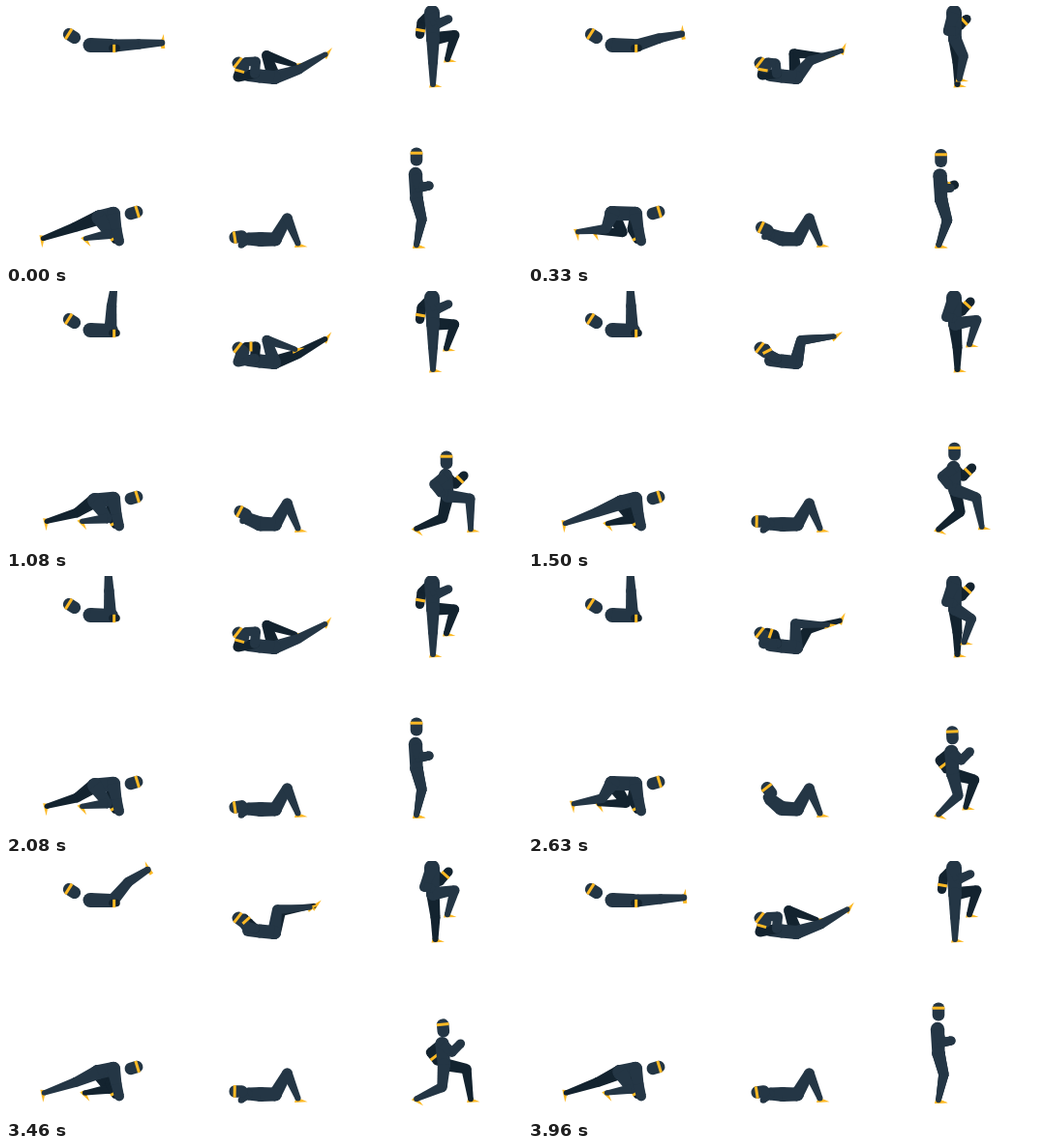
These frames come from a looping animation (533 by 266 pixels, 4 s). An HTML page with a canvas:

```html
<!DOCTYPE html>
<html lang="en">
<head>
<meta charset="utf-8">
<title>Workout</title>
<style>
html, body { margin: 0; width: 100%; height: 100%; overflow: hidden; background: #fff; }
canvas { display: block; width: 533px; height: 266px; }
</style>
</head>
<body>
<canvas id="stage"></canvas>
<script>
const NAVY = '#243645', DARK = '#13232f', GOLD = '#fdb924';
const W = 533, H = 266, LOOP = 4000, RAD = Math.PI / 180;
const canvas = document.getElementById('stage');
const ctx = canvas.getContext('2d');
const dpr = window.devicePixelRatio || 1;
canvas.width = W * dpr;
canvas.height = H * dpr;

const clamp = (v, a = 0, b = 1) => Math.min(b, Math.max(a, v));
const lerp = (a, b, k) => a + (b - a) * k;
const mix = (p, q, k) => [lerp(p[0], q[0], k), lerp(p[1], q[1], k)];
const add = (p, x, y) => [p[0] + x, p[1] + y];
const polar = (p, r, deg) => add(p, r * Math.cos(deg * RAD), -r * Math.sin(deg * RAD));
const hump = k => Math.sin(Math.PI * k);
const ramp = (t, a, b) => {
  const u = clamp((t - a) / (b - a));
  return u * u * (3 - 2 * u);
};
const rise = (t, a, b, c, d) => ramp(t, a, b) - ramp(t, c, d);

function poly(pts, color) {
  ctx.fillStyle = color;
  ctx.beginPath();
  pts.forEach(p => ctx.lineTo(p[0], p[1]));
  ctx.closePath();
  ctx.fill();
}

function dot(p, r, color) {
  ctx.fillStyle = color;
  ctx.beginPath();
  ctx.arc(p[0], p[1], r, 0, 7);
  ctx.fill();
}

// Tapered limb through joints, with a radius at each joint
function limb(color, joints, radii) {
  joints.forEach((p, i) => {
    dot(p, radii[i], color);
    if (!i) return;
    const o = joints[i - 1], r = radii[i - 1], s = radii[i];
    const a = Math.atan2(p[1] - o[1], p[0] - o[0]);
    const nx = -Math.sin(a), ny = Math.cos(a);
    poly([add(o, nx * r, ny * r), add(p, nx * s, ny * s),
          add(p, -nx * s, -ny * s), add(o, -nx * r, -ny * r)], color);
  });
}

function local(p, deg, draw) {
  ctx.save();
  ctx.translate(p[0], p[1]);
  ctx.rotate(deg * RAD);
  draw();
  ctx.restore();
}

function foot(p, deg) {
  local(p, deg, () => poly([[-3, 0], [3, 0], [9.5, 2.8], [-4, 3.4]], GOLD));
}

function head(p, deg) {
  local(p, deg, () => {
    ctx.fillStyle = NAVY;
    ctx.beginPath();
    ctx.roundRect(-6.3, -9.5, 12.6, 19, 6);
    ctx.fill();
    ctx.fillStyle = GOLD;
    ctx.fillRect(-6.3, -5.3, 12.6, 3);
  });
}

// Wristband across the segment a-b at fraction k
function band(a, b, k, r) {
  const deg = Math.atan2(b[1] - a[1], b[0] - a[0]) / RAD;
  local(mix(a, b, k), deg, () => {
    ctx.fillStyle = GOLD;
    ctx.fillRect(-1.5, -r, 3, 2 * r);
  });
}

// Middle joint of a two-bone limb
function bend(a, b, l1, l2) {
  const dx = b[0] - a[0], dy = b[1] - a[1];
  const d = Math.hypot(dx, dy);
  const c = clamp((l1 * l1 + d * d - l2 * l2) / (2 * l1 * d), -1, 1);
  const ang = Math.atan2(dy, dx) - Math.acos(c);
  return add(a, l1 * Math.cos(ang), l1 * Math.sin(ang));
}

function leg(color, hip, knee, ankle, deg, radii) {
  foot(ankle, deg);
  limb(color, [hip, knee, ankle], radii);
}

function legRaise(t) {
  const k = rise(t, 60, 1300, 2800, 4000);
  const a = 3.5 + 89 * k, flex = 9 * hump(k);
  const hip = [lerp(113, 107.5, k), lerp(41, 39.5, k)];
  const knee = polar(hip, 24, a + flex), end = polar(knee, 24, a - flex);
  head([68, 31], -58);
  local(end, flex - a, () => poly([[-1, 6], [-1, 2], [0, -3.5], [2.5, -9], [3, 6]], GOLD));
  limb(NAVY, [hip, knee, end], [6.5, 5.2, 3.4]);
  limb(NAVY, [[87, 40.5], [109, 41]], [7.5, 7]);
  limb(DARK, [[110, 43.5], [114, 43.5]], [3.8, 3.8]);
  band([104, 44], [120, 44], 0.48, 4.2);
}

function bicycle(t) {
  const q = Math.cos(t / 1000 * Math.PI), twist = clamp(q * 1.5, -1, 1);
  const hip = [277, 74], shoulder = [257, 70];
  const pedal = (color, s) => {
    const m = 1 - s * s;
    const knee = [285.5 + 16.5 * s - 3.5 * m, 58.5 + 7.5 * s - 7.5 * m];
    const ankle = [314 + 16 * s + 2 * m, 55.5 - 5.5 * s - 8.5 * m];
    leg(color, hip, knee, ankle, -45 - 16 * s - 60 * s * m, [7, 5, 2.6]);
  };
  const elbow = s => mix([239.5, 73.5], [258, 57.5], (s + 1) / 2);
  const hand = s => mix([243, 61], [248, 57.5], (s + 1) / 2);
  const far = [elbow(-twist), hand(-twist)];
  pedal(DARK, -q);
  pedal(NAVY, q);
  limb(NAVY, [[250, 72], [262, 72.5], hip], [6, 7, 7]);
  limb(DARK, [shoulder, ...far], [5, 5, 4.5]);
  limb(NAVY, [shoulder, elbow(twist), hand(twist)], [5, 5, 4.5]);
  head([242.5, 61], -52);
  band(...far, 0.5, 5);
}

function highKnees(t) {
  const c = Math.cos(t / 500 * Math.PI), k = clamp(c * 1.5, -1, 1) / 2 + 0.5;
  const lift = d => ramp(230 - Math.abs(d), 0, 200);
  const far = lift((t + 500) % 1000 - 500), near = lift(t % 1000 - 500);
  const hip = [441, 34], neck = [440, 7];
  const step = (color, x, h) => {
    const knee = [lerp(x, 463.5, h) + 6 * hump(h), lerp(58, 30, h)];
    const ankle = [lerp(x, 456, h) + 2 * hump(h), lerp(81, 55, h)];
    leg(color, hip, knee, ankle, 0, [6.8, 5, 3]);
  };

  const elbow = mix([448, 21], [429.5, 17], k), hand = mix([457, 11], [427.5, 29.5], k);
  limb(DARK, [neck, elbow, hand], [5.5, 5, 4.6]);
  band(elbow, hand, 0.65, 5);
  step(DARK, 443.5, far);
  limb(NAVY, [neck, hip], [8, 6.8]);
  step(NAVY, 441, near);
  limb(NAVY, [neck, mix([432, 27], [445, 19], k), mix([439, 28], [457, 13.5], k)], [6.5, 5, 4.3]);
}

function climber(t) {
  const c = Math.cos(t / 500 * Math.PI), k = Math.min(1, 2 * (1 - c * c));
  const hip = [96 - 9 * k, 219 - 4.5 * k], shoulder = [111, 215];
  const step = (color, s) => {
    const knee = mix([71, 229], [107, 236], (s + 1) / 2);
    const ankle = [60.5 + 17 * s + 5 * s ** 3, 240.5 - 9 * (1 - s * s)];
    leg(color, hip, knee, ankle, 62 - 18 * s, [7.5, 5, 2.6]);
  };
  step(DARK, -c);
  limb(DARK, [[110, 218], [107, 231], [113, 242]], [5, 4.5, 4]);
  band([107, 231], [113, 242], 0.85, 4.6);
  limb(NAVY, [hip, shoulder], [7.5, 7.2]);
  step(NAVY, c);
  limb(NAVY, [shoulder, [114, 231], [117, 243.5]], [7, 5.5, 5]);
  head([132, 214], 73);
}

function sitUp(t) {
  const u = t % 2000, e = rise(u, 60, 620, 780, 1400);
  const tip = (1 - ramp(u, 80, 300) + ramp(u, 1500, 1950)) * 10;
  const hip = [278, 241.5], chest = mix([250, 241], [250, 231], e);
  foot([302, 246.5], 0);
  limb(NAVY, [hip, [290.5, 219.5], [301.5, 245.5]], [6.8, 5.3, 3]);
  limb(NAVY, [chest, mix([263, 241.5], [262, 240.5], e), hip], [6.5, 7.5, 7]);
  limb(NAVY, [chest, mix([243, 247.5], [246, 229], e)], [5, 3.3]);
  head(mix([240, 238.5 + tip / 20], [249, 222], e), lerp(-89 - tip, -38, e));
}

function lunge(t) {
  const second = t >= 2130, p = second ? t - 2130 : t;
  const e = rise(p, 230, 800, 1200, 1830);
  const s = rise(p, 310, 690, 1380, 1800);
  const k = clamp(e * 2.2);
  const shoulder = [423 + 31 * e, 174 + 17 * e], hip = [424 + 32 * e, 199 + 13 * e];
  const step = (color, lead) => {
    const ankle = lead
      ? [424 + 56 * s, 247.5 - s - 8 * hump(s) ** 2]
      : [424, 247.5 - 1.5 * e];
    const knee = bend(hip, ankle, 22.5 + s, 27.2 + (lead ? 4.5 : 2) * s);
    leg(color, hip, knee, ankle, lead ? 0 : 32 * e, [6.6, 5.2, 2.8]);
  };
  const arm = (color, forward, strap) => {
    const rest = add(shoulder, 4, 14), restHand = add(shoulder, 14, 12);
    const elbow = mix(rest, forward ? add(shoulder, 10, 9) : add(shoulder, -12, 9), k);
    const hand = mix(restHand, forward ? add(shoulder, 19, 0) : add(shoulder, -5, 18), k);
    limb(color, [shoulder, elbow, hand], [5.5, 4.8, 4.6]);
    if (strap && k > 0.1) band(elbow, hand, 0.55, 4.8);
  };
  arm(DARK, !second, true);
  step(DARK, second);
  limb(NAVY, [shoulder, hip], [7.2, 6.6]);
  step(NAVY, !second);
  arm(NAVY, second);
  head([424 + 31 * e, 156 + 19 * e], second ? -6 * e : 0);
}

const figures = [legRaise, bicycle, highKnees, climber, sitUp, lunge];
const start = performance.now();

function frame() {
  const t = (performance.now() - start) % LOOP;
  ctx.setTransform(dpr, 0, 0, dpr, 0, 0);
  ctx.fillStyle = '#fff';
  ctx.fillRect(0, 0, W, H);
  figures.forEach(draw => draw(t));
  requestAnimationFrame(frame);
}
frame();
</script>
</body>
</html>
```
